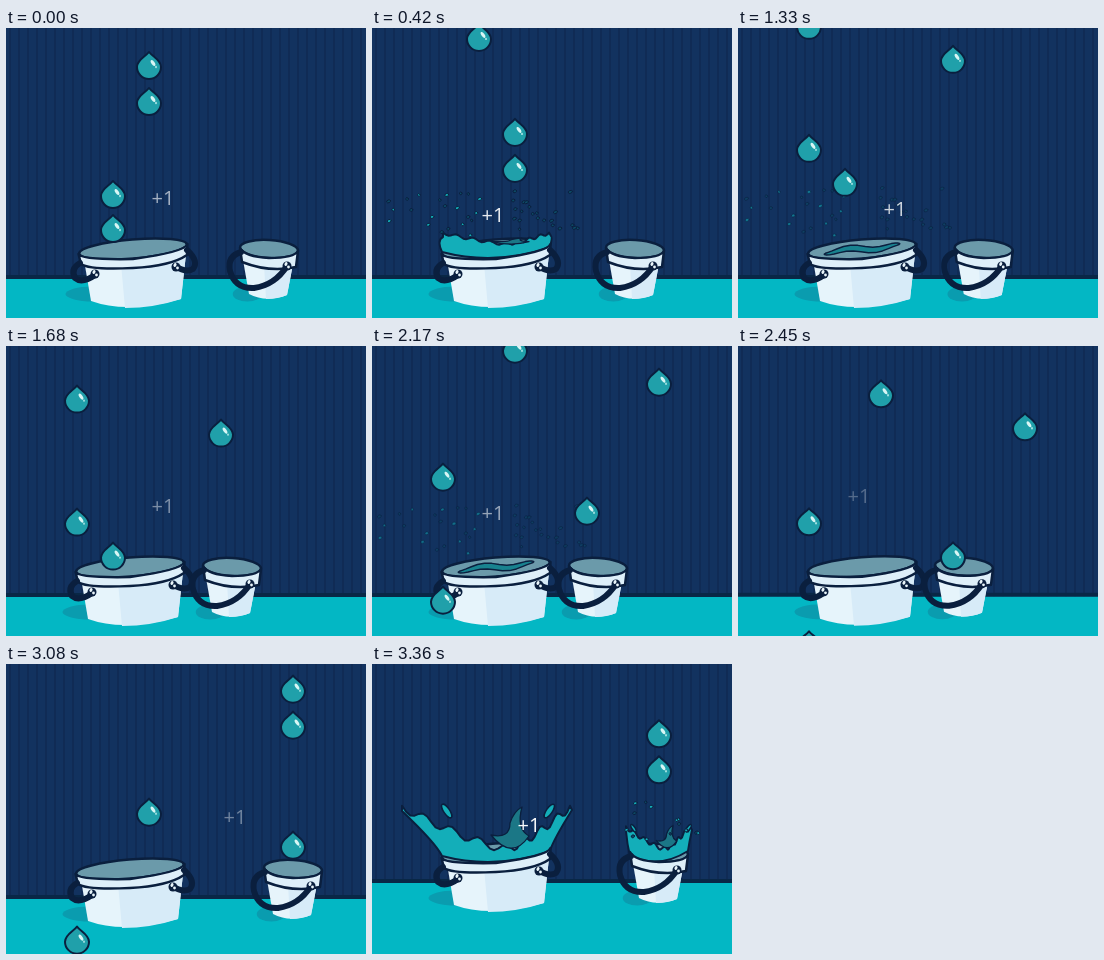
Write an HTML page with a canvas that moves like this. It is 360 by 290 pixels and loops after 3.43 s.

```html
<!DOCTYPE html>
<html lang="en">
<head>
<meta charset="utf-8">
<title>Drops and buckets</title>
<style>
html, body { margin: 0; width: 100%; height: 100%; overflow: hidden; background: #12305d; }
canvas { display: block; }
</style>
</head>
<body>
<canvas id="stage" width="360" height="290"></canvas>
<script>
const ctx = document.getElementById('stage').getContext('2d');
const LOOP = 3430, STEP = 70, SPEED = 0.1593, SPLASH = 520;
const INK = '#0a1f3e', TEAL = '#13aeb9', DEEP = '#1b7786';

const ramp = (t, a, b) => Math.min(1, Math.max(0, (t - a) / (b - a)));
const mix = (a, b, k) => a + (b - a) * k;

// Column and height at time zero; column 0 is out of reach of both buckets
const drops = [[2, 280], [1, 202], [1, 168], [2, 75], [2, 39], [1, -56], [0, -90], [0, -213],
  [4, -179], [6, -308], [2, -341], [6, -428], [6, -464]]
  .map(([column, y]) => ({ column, y, x: 71 + 36 * column, end: Infinity }));
const heightOf = (d, t) => d.y + SPEED * t;

// Every missed drop lifts the water on the floor
const misses = drops.filter(d => d.column === 0).map(d => (300 - d.y) / SPEED);
const rise = t => misses.reduce((sum, m) => sum + 16 * ramp(t, m, m + 130), 0);

for (const d of drops) {
  if (d.column === 0) continue;
  let t = -600;
  while (heightOf(d, t) < 219 - rise(t)) t += 5;
  d.end = t;
}
const caught = drops.filter(d => d.end < LOOP).sort((a, b) => a.end - b.end);

// A splash always plays to its end before the next one starts
function splashes(hits) {
  const starts = [];
  for (const d of caught.filter(d => d.end >= 0 && hits(d.column))) {
    if (!starts.length || d.end - starts[starts.length - 1] > SPLASH) starts.push(d.end);
  }
  return starts;
}

const big = {
  starts: splashes(c => c < 4), shift: t => 3 * (1 - ramp(t, 0, 140)),
  cx: 124, w: 54, ry: 9.5, tilt: -0.085, left: 94, right: 74, h: 42, specks: 44,
  body: 'M75 232L82 273Q118 286 172 271L177 226Z',
  facet: 'M112 236L116 280Q145 280 172 271L177 226Z',
  rim: 'M69.5 226Q72 232 124 231Q176 224 178.5 216L178 227Q162 238 124 240Q80 242 72 236Z',
  handles: 'M71 235Q61 241 66 250Q73 256 86 247M178 222Q190 233 184 241Q177 245 166 238',
  knobs: [[86, 246], [167, 239]]
};
const small = {
  starts: splashes(c => c >= 4),
  shift: t => -37 * ramp(t, 1190, 1490) + 61 * ramp(t, 2480, 2830),
  cx: 263, w: 29, ry: 9, tilt: 0.06, left: 33, right: 31, h: 22, specks: 14,
  body: 'M237 232L243 266Q260 275 281 267L287 236Z',
  facet: 'M258 236L260 271Q272 271 281 267L287 236Z',
  rim: 'M234 220Q239 229 263 230Q288 230 292 223L290 239Q264 245 236 234Z',
  handles: 'M235 224Q221 228 224 243Q229 261 248 260Q269 257 281 238',
  knobs: [[281, 238]]
};

function shape(path, fill, stroke, width = 2.5) {
  const p = typeof path === 'string' ? new Path2D(path) : path;
  if (fill) { ctx.fillStyle = fill; ctx.fill(p); }
  if (stroke) { ctx.strokeStyle = stroke; ctx.lineWidth = width; ctx.stroke(p); }
}
function ellipse(x, y, rx, ry, angle, ...style) {
  const p = new Path2D();
  p.ellipse(x, y, rx, ry, angle, 0, 7);
  shape(p, ...style);
}

function room(water) {
  ctx.fillStyle = '#12325f';
  ctx.fillRect(0, 0, 360, 290);
  ctx.fillStyle = '#102b55';
  for (let x = 3; x < 360; x += 9) ctx.fillRect(x, 0, 2, 290);
  ctx.fillStyle = '#092746';
  ctx.fillRect(0, water - 4, 360, 4);
  ctx.fillStyle = '#03b7c4';
  ctx.fillRect(0, water, 360, 290);
}

// A bowl of water between two tips; k goes from the tall crown to the low wave
function crown({ cx, w, left, right, h, ry }, k) {
  const base = 217 - k, tall = mix(h, 11, k), wave = mix(h / 10, 1.5, k);
  const mid = cx + w * 0.2;
  const l = cx - mix(left, w - 1, k), r = cx + mix(right, w - 1, k);
  const p = new Path2D();
  p.moveTo(cx - w, 224);
  p.quadraticCurveTo(cx - w * 1.1, 212, l, base - tall + 4);
  for (let u = -1; u <= 1.001; u += 0.04) {
    const x = u < 0 ? mix(mid, l, -u) : mix(mid, r, u), a = Math.abs(u);
    p.lineTo(x, base - tall * a ** 1.3 + wave * Math.cos(24 * (0.66 - a)));
  }
  p.lineTo(r + 2, base - tall + 3);
  p.quadraticCurveTo(cx + w * 1.05, 209, cx + w, 219);
  p.quadraticCurveTo(cx, 222 + ry * 1.7, cx - w, 224);
  shape(p, TEAL, INK, 2);
}

// The darker spout at the back of the bowl
function spout({ cx, w }, k) {
  const s = w / 54, flat = mix(s, 0.12, k);
  const at = (x, y) => [cx + x * s, 215 + y * flat];
  const p = new Path2D();
  p.moveTo(...at(-5, -12));
  p.quadraticCurveTo(...at(14, -8), ...at(14, -24));
  p.quadraticCurveTo(...at(18, -36), ...at(26, -40));
  p.quadraticCurveTo(...at(20, -18), ...at(33, -11));
  p.quadraticCurveTo(...at(16, mix(14, 30, k)), ...at(-5, -12));
  shape(p, DEEP, INK, 1.3);
}

function ripple({ cx, w, tilt }) {
  const p = new Path2D();
  for (let a = 0; a < 6.28; a += 0.2) {
    const x = Math.cos(a) * w * 0.7;
    p.lineTo(cx + x, 221 + x * tilt + 2 * Math.sin(x / 8) + 3 * Math.sin(a));
  }
  p.closePath();
  shape(p, '#18828f', INK, 1.5);
}

function spray({ cx, w, specks }, age) {
  const scale = w / 54, reach = mix(0.8, 1, age / 300);
  let seed = 29;
  const rand = () => (seed = seed * 16807 % 2147483647) / 2147483647;
  ctx.globalAlpha = 1 - ramp(age, 330, 540);
  if (age < 200) {
    for (const side of [-1, 1]) {
      ellipse(cx + 2 + side * w * 0.95, 216 - 37 * scale, 3 * scale, 8 * scale, side * 0.6, TEAL, INK, 1.5);
    }
  }
  if (age > 130) {
    for (let i = 0; i < specks; i++) {
      const side = i % 2 ? 1 : -1, out = rand();
      const x = cx + side * (0.3 + out * (1.5 - side * 0.25)) * w * reach;
      const y = 207 - (rand() * 44 + 4 * side * out) * reach;
      ellipse(x, y, 1 + rand() * 1.2, 1.4, -0.4, i % 4 < 2 - scale ? TEAL : '#0d4a66', INK, 1);
    }
  }
  ctx.globalAlpha = 1;
}

function bucket(b, t) {
  const age = t - Math.max(-LOOP, ...b.starts.filter(s => s <= t));
  const k = ramp(age, 160, 290);
  ctx.save();
  ctx.translate(b.shift(t), -rise(t));
  ellipse(b.cx - b.w * 0.75, 266, b.w * 0.5, 7.5, 0, '#0a9caf');
  shape(b.body, '#e6f4fb');
  shape(b.facet, '#d7ebf8');
  ellipse(b.cx, 221, b.w, b.ry, b.tilt, '#6b9aaa', INK);
  if (age < 360) {
    crown(b, k);
    spout(b, k);
  } else if (age < SPLASH) ripple(b);
  shape(b.rim, '#deeff9', INK);
  shape(b.handles, null, INK, 6);
  for (const [x, y] of b.knobs) {
    ellipse(x, y, 4.5, 4.5, 0, INK);
    ellipse(x - 1, y - 2, 1.4, 2, 0.5, '#eaf6fb');
    ellipse(x + 1.5, y + 1, 1.4, 1.4, 0, '#eaf6fb');
  }
  if (age < SPLASH) spray(b, age);
  ctx.restore();
}

function drop(x, y) {
  ctx.save();
  ctx.translate(x, y);
  shape('M0 -14C4 -9 12 -6 12 1A12 12 0 0 1 -12 1C-12 -6 -4 -9 0 -14Z', '#20a0aa', INK, 2);
  ellipse(4, -3, 1.6, 3.4, -0.6, '#d9f6f5');
  ellipse(7, 1, 1, 1.2, 0, '#9fdfe0');
  ctx.restore();
}

function score(t) {
  const { x, end } = caught.filter(d => d.end <= t).pop();
  const age = t - end;
  ctx.globalAlpha = 1 - ramp(age, 0, 1000);
  ctx.fillStyle = '#fff';
  ctx.font = '400 20px "Open Sans", "Noto Sans", sans-serif';
  ctx.textAlign = 'center';
  ctx.fillText('+1', x + 14, 200 - rise(end) - age * 0.06);
  ctx.globalAlpha = 1;
}

function draw(now) {
  const t = Math.floor(now % LOOP / STEP) * STEP;
  ctx.lineJoin = ctx.lineCap = 'round';
  room(251 - rise(t));
  bucket(big, t);
  bucket(small, t);
  for (const d of drops) if (t < d.end) drop(d.x, heightOf(d, t) - 1);
  score(t);
}

const begin = performance.now();
function tick() {
  draw(performance.now() - begin);
  requestAnimationFrame(tick);
}
tick();
</script>
</body>
</html>
```
